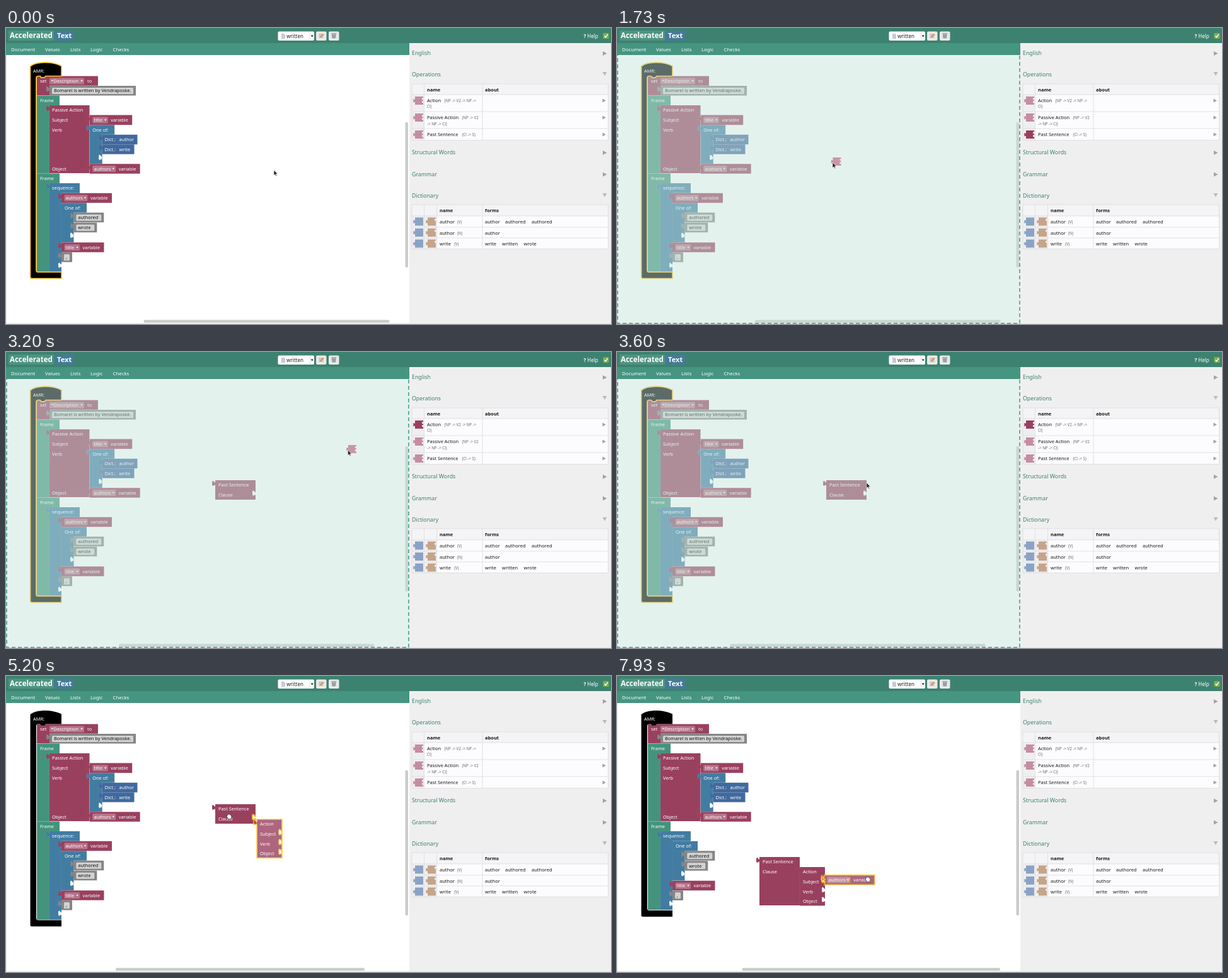
These frames come from a looping animation (960 px wide and 471 px high, 8 s). An HTML page:

```html
<!DOCTYPE html>
<html lang="en">
<head>
<meta charset="utf-8">
<style>
  html, body { margin: 0; width: 100%; height: 100%; overflow: hidden; background: #fff; }
  svg { display: block; width: 960px; height: 471px; }
  text { font-family: "Noto Sans", "Open Sans", sans-serif; white-space: pre; font-variant-ligatures: none; }
  .block > path { stroke: rgba(255,255,255,.08); stroke-width: .5; }
  .selected > path { stroke: #f9c22e; stroke-width: 1.7; }
  .dragging { opacity: .8; }
</style>
</head>
<body>
<svg id="stage" viewBox="0 0 960 471"></svg>
<script>
const ROW = 15.55;
const CRIMSON = '#99405f', TEAL = '#44937d', BLUE = '#427ca2', NAVY = '#41699e', GRAY = '#858585';
const PINK = '#c58da1', GREEN = '#3a806c', LINE = '#dcdadc', INK = '#1a1a1a';
const TAB = 'c0,-6 -5,5 -5,-4.6s5,1.5 5,-1.6';

const text = (x, y, s, fill = '#fff', size = 7.4, extra = '') =>
  `<text x="${x}" y="${y}" fill="${fill}" font-size="${size}" ${extra}>${s.replace(/>/g, '&gt;')}</text>`;
const rect = (x, y, w, h, fill, r = 0, extra = '') =>
  `<rect x="${x}" y="${y}" width="${w}" height="${h}" fill="${fill}" rx="${r}" ${extra}/>`;
const path = (d, fill, extra = '') => `<path d="${d}" fill="${fill}" ${extra}/>`;
const label = (row, s, x = 5) => text(x, row * ROW + 10.4, s);

// Outline of a block given as stacked [width, height] rows
function outline(rows, hasTab = true) {
  let y = 0, d = 'M0,0';
  for (const [w, h] of rows) d += `H${w}V${y += h}`;
  return d + (hasTab ? `H0V9.5${TAB}Z` : 'H0Z');
}
const block = (x, y, color, rows, inner = '', id = '', hasTab = true) =>
  `<g class="block" ${id && `id="${id}"`} transform="translate(${x},${y})">${path(outline(rows, hasTab), color)}${inner}</g>`;
const socket = (x, row, id = '') => path(`M${x},${row * ROW + 9.5}${TAB}Z`, '#fff', id && `id="${id}"`);
const dropdown = (x, w, s) => rect(x, 2.9, w, 10, 'rgba(255,255,255,.27)', 1.5) +
  text(x + 2.3, 10.4, s) + path(`M${x + w - 5.6},6.6h3.4l-1.7,2.8z`, '#eee');
const variable = (x, y, name, field, id) => block(x, y, CRIMSON, [[field + 43, ROW]],
  dropdown(4.5, field, name) + label(0, 'variable', field + 9), id);
const quote = (x, y, s, w) => block(x, y, GRAY, [[w, ROW]],
  rect(4, 2.9, w - 8, 10, '#d2d2d2', 1.5) + text(7, 10.4, s, '#111'));
const dict = (y, s, w) => block(152.5, y, NAVY, [[w, ROW]], label(0, 'Dict.:', 4) + label(0, s, 27));

const rootPath = drop => `M38.5,61C48,53 74,53 88,60.5V76.5H63l-2,2.3h-5l-2,-2.3H51q-3,0 -3,3V${385.5 - drop}q0,3 3,3` +
  `H88V${398.5 - drop}H41q-2.5,0 -2.5,-2.5Z`;
const frameRows = drop => [[36, 15.8], [20, 141 - drop]];
const sequenceRows = drop => [[48, 15.8], [19, 125.2 - drop]];
const pastRows = joined => [[64, joined ? 77 : 31]];

function workspace() {
  return rect(0, 43, 640, 428, '#fff') +
    block(49, 76.5, CRIMSON, [[97, 15.3], [20, 15.5]],
      label(0, 'set') + dropdown(20, 55, '*Description') + label(0, 'to', 80), '', false) +
    quote(69, 92, 'Bomarel is written by Vendraposke.', 137) +
    block(49, 107.5, TEAL, [[36, 15.7], [20, 108.3]], label(0, 'Frame'), '', false) +
    block(69, 123, CRIMSON, [[63.5, 108]], label(0, 'Passive Action', 4) + label(1, 'Subject', 4) +
      label(2, 'Verb', 4) + label(6, 'Object', 4)) +
    variable(132.7, 138.6, 'title', 24.5) +
    block(132.7, 154.2, BLUE, [[39.5, 15.6], [20, 46.5]], label(0, 'One of:', 4.5) + socket(19.5, 3)) +
    dict(169.7, 'author', 56) + dict(185.3, 'write', 51) +
    variable(132.7, 216.2, 'authors', 37) +
    block(49, 231.5, TEAL, frameRows(0), label(0, 'Frame'), 'frame', false) +
    block(69, 247, BLUE, sequenceRows(0), label(0, 'sequence:', 4), 'sequence') +
    `<g id="tail">` +
      block(88, 278.2, BLUE, [[40, 15.6], [19.5, 47.2]], label(0, 'One of:') + socket(19, 3)) +
      quote(107.3, 293.8, 'authored', 48) + quote(107.3, 309.8, 'wrote', 37) +
      variable(88, 341.3, 'title', 24.5) + quote(88, 357, ',', 17) +
      `<g transform="translate(88,372.5)">${socket(0, 0)}</g>` +
      path('M49,388.3H88', 'none', 'stroke="#fff"') +
    `</g>` +
    `<g class="block" id="root">${path(rootPath(0), '#000')}${text(43, 70.6, 'AMR:')}</g>` +
    rect(633.5, 150, 4.5, 231, '#cbcbcb', 2) + rect(0, 464.5, 10, 4.5, '#cbcbcb', 2, 'id="scroll"') +
    block(0, 0, CRIMSON, pastRows(false), label(0, 'Past Sentence') + label(1, 'Clause') + socket(64, 1, 'clause'), 'past') +
    block(0, 0, CRIMSON, [[40, 61.5]], ['Action', 'Subject', 'Verb', 'Object']
      .map((s, i) => label(i, s) + (i ? socket(40, i) : '')).join(''), 'action') +
    variable(88, 262.7, 'authors', 37, 'authors') +
    path(`M0,9.5${TAB}`, 'none', 'id="hint" stroke="#f9c22e" stroke-width="2"') +
    path('M0,43V471M0,470.5H960', 'none', 'stroke="#ddd"') +
    `<g id="overlay">${rect(0, 43, 640, 428, 'rgba(197,228,220,.47)')}
      <rect x="1" y="42" width="638" height="428" fill="none" stroke="#69b0a0" stroke-width="2" stroke-dasharray="6 4"/></g>`;
}

function topBar() {
  const menus = [['Document', 8], ['Values', 62], ['Lists', 102], ['Logic', 134], ['Checks', 169.5]];
  return rect(0, 0, 960, 24, '#3d8270') + rect(0, 24, 640, 19, '#459581') +
    rect(4, 4, 72, 16, '#4e9481', 1) + rect(77, 4, 31, 16, '#457a99', 1) +
    text(6, 16.2, 'Accelerated', '#fff', 11.5, 'font-weight="600"') + text(81, 16.2, 'Text', '#fff', 11.2, 'font-weight="600"') +
    menus.map(([s, x]) => text(x, 36.6, s, '#fff', 7.8)).join('') +
    rect(431.5, 5.5, 57.5, 14.5, '#fff', 2) + rect(482, 6, .6, 13.5, '#ccc') +
    path('M437,9h4l2,2v6h-6z', '#c5cbd0') + text(445, 15.6, 'written', '#222', 8) + path('M483.7,11.5h4l-2,3z', '#222') +
    rect(492, 5.5, 16.5, 14.5, '#e9e9e9', 2) + rect(512, 5.5, 16.5, 14.5, '#e9e9e9', 2) +
    rect(496.5, 9, 7, 7, '#cfc4ba', .5) + path('M498,14.5l5,-5.5 1.5,1.3 -5,5z', '#d58a4f') +
    path('M516.5,9.5h7.5l-1,7h-5.5zM516,8h8.5v1h-8.5z', '#9aa0a4') +
    text(916.5, 15.6, '?', '#fff', 8, 'font-weight="700"') + text(922.3, 15.6, 'Help', '#fff', 8) +
    rect(947.5, 8, 9, 9, '#7fae48', 1) + path('M949.5,12.5l2,2.3 3.3,-5', 'none', 'stroke="#fff" stroke-width="1.4"');
}

const icon = (x, y, fill, sockets, id = '') =>
  `<g transform="translate(${x},${y})" ${id && `id="${id}"`} fill="${fill}"><path d="M0,0H13V13H0V8.6l-2.7,.8V4l2.7,.8Z"/>` +
  Array.from({ length: sockets }, (_, i) => rect(11, 2.3 + i * 5, 2, 2.8, '#f2eff1')).join('') + '</g>';
const rightArrow = (x, y, s) => path(`M${x},${y - s}v${2 * s}l${1.8 * s},${-s}z`, '#a3a1a3');

function table(top, bottom, columns, rows, whiteFrom) {
  return rect(644, top, 311.5, rows[0] - top, '#f4f3f5') + rect(whiteFrom, rows[0], 955.5 - whiteFrom, bottom - rows[0], '#fcfbfd') +
    path([top, ...rows, bottom].map(y => `M644,${y}H955.5`).join('') +
      [644, ...columns, 955.5].map(x => `M${x},${top}V${bottom}`).join(''), 'none', `stroke="${LINE}" stroke-width=".8"`);
}

function sidebar() {
  const sections = [['English', 40], ['Operations', 74, 1], ['Structural Words', 198], ['Grammar', 232.5], ['Dictionary', 267, 1]];
  const heading = (x, y, s) => text(x, y, s, INK, 7.5, 'font-weight="600"');
  const name = (x, y, s) => text(x, y, s, INK, 7.5, 'font-weight="500"');
  const note = (x, y, s) => text(x, y, s, '#6c6c6c', 6.2);
  const lexicon = [['author', '(V)', 'author', 'authored', 'authored'], ['author', '(N)', 'author'], ['write', '(V)', 'write', 'written', 'wrote']];
  const formX = [[760, 792, 834], [760], [760, 787, 821.5]];
  return rect(640, 24, 320, 446.5, '#f0eff0') +
    sections.map(([s, y, open]) => text(644, y + 3.1, s, GREEN, 8.8) +
      (open ? path(`M946.5,${y - 4}h7l-3.5,6z`, '#bbb9bb') : rightArrow(947, y + .5, 3.6))).join('') +
    table(89, 178.5, [663.5, 756], [106, 133, 160], 663.5) +
    heading(668, 100.6, 'name') + heading(760, 100.6, 'about') +
    name(668, 118, 'Action') + note(695.5, 118, '(NP -> V2 -> NP ->') + note(668, 127.3, 'Cl)') +
    name(668, 145, 'Passive Action') + note(723.5, 145, '(NP -> V2') + note(668, 154.5, '-> NP -> Cl)') +
    name(668, 172, 'Past Sentence') + note(723.5, 172, '(Cl -> S)') +
    [115.5, 142.5, 169.5].map(y => rightArrow(946.5, y, 3)).join('') +
    icon(649, 109, PINK, 2, 'actionIcon') + icon(649, 136, PINK, 2) + icon(649, 163, PINK, 2, 'pastIcon') +
    table(281, 351.5, [663.5, 683.5, 756], [299, 317, 334], 683.5) +
    heading(688, 293, 'name') + heading(760, 293, 'forms') +
    lexicon.map(([word, kind, ...forms], i) => {
      const y = 311 + i * 17.5;
      return icon(649, y - 9.5, '#8aa3c5', 0) + icon(669, y - 9.5, '#c5a58a', 1) +
        name(688, y, word) + note(word === 'write' ? 711 : 716, y, kind) +
        forms.map((s, k) => name(formX[i][k], y, s)).join('');
    }).join('');
}

document.getElementById('stage').innerHTML = workspace() + topBar() + sidebar() +
  `<g id="ghost" opacity=".9">${icon(0, 0, PINK, 2)}</g>` +
  `<g id="arrow">${path('M0,0V8.6l2,-1.8 1.5,3 1.3,-.6 -1.4,-3h2.6z', '#222', 'stroke="#fff" stroke-width=".6"')}</g>` +
  `<g id="hand">${path('M-3.6,0q-1,-2 .8,-1.8q-.8,-2.4 .9,-2q.8,-1 1.7,0q1,-.7 1.6,.4q1.5,-.1 1.5,1.5q1.4,.4 1,2.4l-1,3.3h-4z', '#fff', 'stroke="#333" stroke-width=".8"')}</g>`;

const CURSOR = [[0, 425, 226], [100, 425, 226], [800, 655, 170], [1130, 655, 170], [1690, 342, 214], [1930, 342, 214],
  [2560, 612, 146], [2620, 612, 146], [2800, 655, 116], [2950, 655, 116], [3500, 396, 208], [3700, 396, 208],
  [4150, 415, 212], [4500, 415, 212], [4950, 427, 240], [5050, 427, 240], [5180, 354, 224], [5350, 354, 224],
  [5900, 248, 308], [6050, 248, 308], [6380, 157, 270], [6980, 157, 270], [7900, 398, 324], [8000, 398, 324]];

function cursorAt(t) {
  const i = Math.max(1, CURSOR.findIndex(k => k[0] > t));
  const [t0, x0, y0] = CURSOR[i - 1], [t1, x1, y1] = CURSOR[i];
  const p = (t - t0) / (t1 - t0), e = p * p * (3 - 2 * p);
  return [x0 + (x1 - x0) * e, y0 + (y1 - y0) * e];
}

const $ = id => document.getElementById(id);
const move = (id, x, y) => $(id).setAttribute('transform', `translate(${x},${y})`);
const show = (id, on) => $(id).setAttribute('visibility', on ? 'visible' : 'hidden');
const reshape = (id, d) => $(id).firstElementChild.setAttribute('d', d);
const mark = (id, selected, dragging = false) => {
  $(id).classList.toggle('selected', selected);
  $(id).classList.toggle('dragging', dragging);
};

const PAST_DROP = 1900, ACTION_DROP = 3660, ACTION_GRAB = 4500, JOIN = 5240, PAST_GRAB = 5350, PAST_RELEASE = 5950, AUTHORS_GRAB = 6980;

function render(t) {
  const between = (a, b) => t >= a && t < b;
  const [cx, cy] = cursorAt(t);
  const joined = t >= JOIN, pulled = t >= AUTHORS_GRAB;

  const pastX = t < PAST_GRAB ? 332 : t < PAST_RELEASE ? cx - 22 : 226;
  const pastY = t < PAST_GRAB ? 204 : t < PAST_RELEASE ? cy - 20 : 288;
  move('past', pastX, pastY);
  show('past', t >= PAST_DROP);
  reshape('past', outline(pastRows(joined)));
  $('clause').style.display = joined ? 'none' : '';
  mark('past', between(5300, AUTHORS_GRAB), between(PAST_GRAB, PAST_RELEASE));

  if (joined) move('action', pastX + 64, pastY + 16);
  else if (t < ACTION_GRAB) move('action', 386, 200);
  else if (t < 5050) move('action', cx - 29, cy - 12);
  else move('action', 398, 228);
  show('action', t >= ACTION_DROP);
  mark('action', between(ACTION_GRAB, 5300), between(ACTION_GRAB, JOIN));

  const drop = pulled ? ROW : 0;
  if (pulled) move('authors', cx - 69, cy - 7.3);
  else move('authors', 88, 262.7);
  mark('authors', pulled, pulled);
  move('tail', 0, -drop);
  reshape('frame', outline(frameRows(drop), false));
  reshape('sequence', outline(sequenceRows(drop)));
  reshape('root', rootPath(drop));
  mark('root', t < ACTION_GRAB);

  show('hint', between(4850, JOIN) || t >= 7650);
  if (joined) move('hint', 330, 319.5);
  else move('hint', 396, 219.5);

  const [start, length] = t < PAST_DROP ? [218.5, 390] : t < ACTION_DROP ? [179, 405.5] :
    t < PAST_RELEASE ? [174, 395] : [198.5, 409.5];
  $('scroll').setAttribute('x', start);
  $('scroll').setAttribute('width', length);

  show('overlay', between(1180, PAST_DROP) || between(3000, ACTION_DROP));
  show('ghost', between(1150, PAST_DROP) || between(2970, 3560));
  move('ghost', cx + .5, cy - 8);
  $('pastIcon').setAttribute('fill', between(760, PAST_DROP) ? CRIMSON : PINK);
  $('actionIcon').setAttribute('fill', between(2770, ACTION_DROP) ? CRIMSON : PINK);

  show('arrow', t < 4000);
  show('hand', t >= 4000);
  move('arrow', cx, cy);
  move('hand', cx, cy);
}

const begin = performance.now();
function tick() {
  render((performance.now() - begin) % 8000);
  requestAnimationFrame(tick);
}
tick();
</script>
</body>
</html>
```
